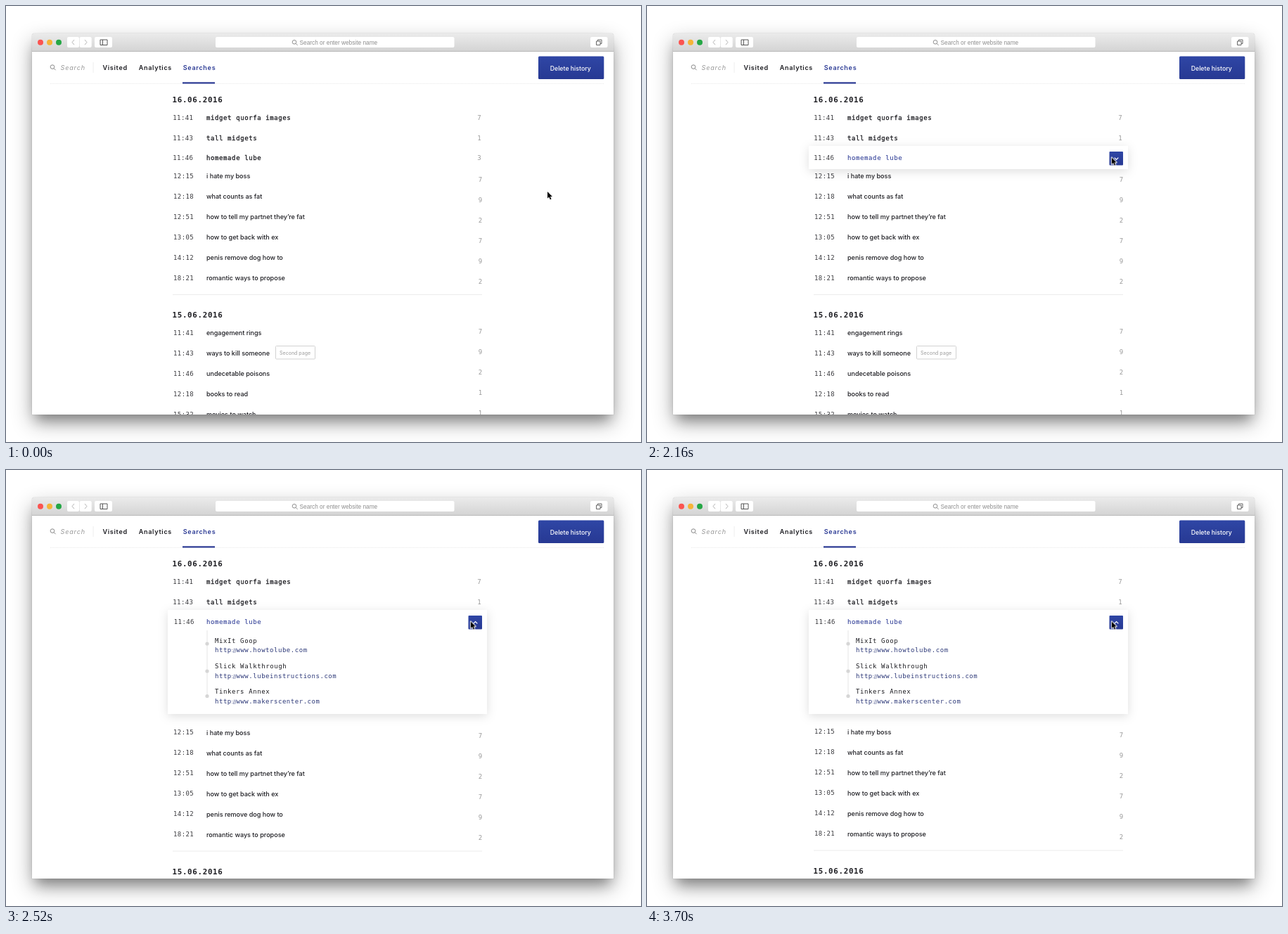
Animation of 903 by 620 pixels, one loop 3960 ms. Source, as an HTML page:

```html
<!DOCTYPE html>
<html lang="en">
<head>
<meta charset="utf-8">
<title>Search history</title>
<style>
  html, body { margin: 0; width: 100%; height: 100%; overflow: hidden; background: #fff; }
  .window {
    position: absolute; left: 37px; top: 39px; width: 827px; height: 542px;
    border-radius: 4px 4px 1px 1px;
    background: linear-gradient(#ebebeb, #d4d4d4 25px, #b9b9b9 25px, #b9b9b9 26px, #fff 26px);
    box-shadow: 0 0 1px rgba(0,0,0,.45), 0 12px 30px rgba(0,0,0,.32), 0 13px 17px -6px rgba(0,0,0,.3);
  }
  svg { position: absolute; left: 0; top: 0; width: 903px; height: 620px; }
  text { font: 500 9.05px Inter, sans-serif; fill: #1d1d22; white-space: pre; }
  .mono { font: 9px "DejaVu Sans Mono", monospace; letter-spacing: .6px; }
  .medium { stroke: currentColor; stroke-width: .3px; fill: currentColor; color: #1d1d22; }
  .time { font: 9px "DejaVu Sans Mono", monospace; letter-spacing: .4px; fill: #3a3a3e; }
  .count { font: 9px "DejaVu Sans Mono", monospace; fill: #999; text-anchor: middle; }
  .date { font: bold 10.8px "DejaVu Sans Mono", monospace; letter-spacing: .7px; }
  .nav { font-weight: 600; letter-spacing: .7px; }
  .hint { font-weight: 400; font-style: italic; letter-spacing: .85px; fill: #999; }
  .address { font: 8.3px "Liberation Sans", sans-serif; fill: #8e8e8e; }
  .tag { font-size: 7px; fill: #a8a8a8; }
  .action { font-size: 8.75px; fill: #fff; }
  .blue { fill: #2b3a94; }
  .link { fill: #2c3878; letter-spacing: .53px; }
  .tight { font: 7.5px Inter, sans-serif; letter-spacing: -.3px; }
  .icon { fill: none; stroke: #777; stroke-width: 1; }
  .white { fill: #fff; }
  #card { filter: drop-shadow(0 3px 7px rgba(0,0,0,.13)); }
  #toggle { transform-origin: 667px 216.5px; }
  #chevron { transform-origin: 667.5px 217px; fill: none; stroke: #fff; stroke-width: 1.3; }
</style>
</head>
<body>
<div class="window"></div>
<svg id="stage" viewBox="0 0 903 620"></svg>
<script>
const LOOP = 3960;
const stage = document.getElementById('stage');

const text = (x, y, cls, str, id = '') =>
  `<text x="${x}" y="${y + 3.3}" class="${cls}"${id && ` id="${id}"`}>${str}</text>`;
const box = (x, y, w, h, attrs) =>
  `<rect x="${x}" y="${y}" width="${w}" height="${h}" ${attrs}/>`;
const line = (d, attrs) => `<path d="${d}" ${attrs}/>`;
const lens = (x, y, color) =>
  `<g class="icon" style="stroke:${color}"><circle cx="${x}" cy="${y}" r="2.8"/>` +
  line(`M${x + 2} ${y + 2}l2.6 2.6`, '') + '</g>';

const rows = (y, gap, items) => items.map(([time, label, count], i) =>
  text(238, y + i * 29, 'time', time) +
  text(285, y + i * 29 + .3, '', label) +
  text(674.5, y + i * 29 + gap, 'count', count)).join('');

const topRow = (y, time, label, count) =>
  text(237.3, y, 'time', time) +
  text(285, y, 'mono medium', label) +
  text(673, y, 'count', count);

const site = (y, dotY, name, host) =>
  `<circle cx="286" cy="${dotY}" r="2.6" fill="#d6d6d6"/>` +
  text(297, y, 'mono', name) +
  text(297, y + 13.7, 'mono link', `http<tspan class="tight">://</tspan>www.${host}`);

const chrome =
  [['#fb5450', 49], ['#f5b437', 62], ['#25a745', 75]].map(([color, x]) =>
    `<circle cx="${x}" cy="51.7" r="4" fill="${color}"/>`).join('') +
  [[87, 17], [104.7, 17], [126, 25], [298, 339.5], [831, 24.5]].map(([x, w]) =>
    box(x, 44, w, 15, 'rx="2" class="white"')).join('') +
  line('M97 48l-3 3.6 3 3.6M112 48l3 3.6-3 3.6', 'class="icon" style="stroke:#b5b5b5"') +
  line('M134 48h10v7.5h-10zM137.5 48v7.5', 'class="icon" style="stroke:#555"') +
  line('M839.5 50h5.5v5.5h-5.5zM841.5 50v-2h5.5v5.5h-2', 'class="icon" style="stroke:#666"') +
  lens(410, 51.3, '#8e8e8e') +
  text(417.5, 51.7, 'address', 'Search or enter website name');

const header =
  lens(66, 86.6, '#888') +
  text(77.5, 87.3, 'hint', 'Search') +
  line('M124 80v15', 'stroke="#eee"') +
  text(137.5, 87.2, 'nav', 'Visited') +
  text(188.7, 87.2, 'nav', 'Analytics') +
  text(251.7, 87.2, 'nav blue', 'Searches') +
  line('M63 110.3h787', 'stroke="#e6e6e6" stroke-dasharray="1 1"') +
  box(251, 108.3, 46, 2.2, 'class="blue"') +
  box(757, 71.5, 93.3, 32.5, 'rx="1.5" fill="url(#button)"') +
  text(773.7, 88.4, 'action', 'Delete history');

const list = `<g id="list">` +
  rows(241.5, 4.7, [
    ['12:15', 'i hate my boss', 7],
    ['12:18', 'what counts as fat', 9],
    ['12:51', 'how to tell my partnet they’re fat', 2],
    ['13:05', 'how to get back with ex', 7],
    ['14:12', 'penis remove dog how to', 9],
    ['18:21', 'romantic ways to propose', 2]]) +
  line('M237 410.5h440', 'stroke="#ececec"') +
  text(236.5, 439.8, 'date', '15.06.2016') +
  rows(464.3, -1.5, [
    ['11:41', 'engagement rings', 7],
    ['11:43', 'ways to kill someone', 9],
    ['11:46', 'undecetable poisons', 2],
    ['12:18', 'books to read', 1],
    ['15:32', 'movies to watch', 1]]) +
  box(383.5, 483.5, 56, 18.5, 'rx="1" fill="#fff" stroke="#d2d2d2"') +
  text(389, 492.4, 'tag', 'Second page') + '</g>';

const hoverRow =
  box(230, 199, 454, 33, 'id="card" class="white"') +
  text(237.3, 215.5, 'time', '11:46', 'hoverTime') +
  text(285, 215.3, 'mono medium', 'homemade lube', 'hoverLabel') +
  text(673, 215.5, 'count', 3, 'hoverCount') +
  '<g clip-path="url(#reveal)"><g id="details">' +
  line('M286 228v94', 'stroke="#e6e6e6"') +
  site(242.3, 247, 'MixIt Goop', 'howtolube.com') +
  site(278.5, 286, 'Slick Walkthrough', 'lubeinstructions.com') +
  site(314.7, 321.5, 'Tinkers Annex', 'makerscenter.com') +
  '</g></g>' +
  '<g id="toggle">' +
  box(657.5, 207, 19.5, 19.5, 'rx="1" fill="url(#button)"') +
  line('M664.7 215.6l2.8 2.8 2.8-2.8', 'id="chevron"') + '</g>';

const cursor = '<g id="cursorX"><g id="cursorY">' +
  line('M0 0v9.6l2.2-2 1.6 3.7 1.7-.7-1.6-3.6h3z',
    'fill="#000" stroke="#fff" stroke-width="1.8" paint-order="stroke" stroke-linejoin="round"') +
  '</g></g>';

stage.innerHTML =
  `<defs><clipPath id="page">${box(37, 65, 827, 516, '')}</clipPath>` +
  `<clipPath id="reveal">${box(230, 199, 454, 33, 'id="revealBox"')}</clipPath>` +
  '<linearGradient id="button" x2="0" y2="1"><stop stop-color="#2f46a5"/>' +
  '<stop offset="1" stop-color="#273993"/></linearGradient></defs>' +
  chrome + '<g clip-path="url(#page)">' + header +
  text(236.5, 134, 'date', '16.06.2016') +
  topRow(158.5, '11:41', 'midget quorfa images', 7) +
  topRow(187.5, '11:43', 'tall midgets', 1) +
  list + hoverRow + '</g>' + cursor;

// Each step is [ms, properties, easing towards the next step].
function play(id, ...steps) {
  const frames = steps.map(([ms, props, easing = 'linear']) =>
    ({ offset: ms / LOOP, easing, ...props }));
  frames.push({ ...frames[frames.length - 1], offset: 1 });
  document.getElementById(id).animate(frames, { duration: LOOP, iterations: Infinity });
}
const x = n => ({ transform: `translateX(${n}px)` });
const y = n => ({ transform: `translateY(${n}px)` });
const fade = n => ({ opacity: n });
const height = n => ({ height: `${n}px` });
const ink = (color, width) => ({ color, strokeWidth: `${width}px` });

// Pointer glides to the row, then nudges onto the toggle.
play('cursorX', [0, x(770)], [150, x(770), 'ease-in-out'], [800, x(664.7)],
  [840, x(664.7), 'ease-in-out'], [1060, x(660.8)]);
play('cursorY', [0, y(264)], [150, y(264), 'cubic-bezier(.7,0,.5,1)'], [800, y(213.6)],
  [840, y(213.6), 'ease-in-out'], [1060, y(215.5)]);

// Hover state.
play('card', [0, { ...fade(0), ...height(33) }], [610, { ...fade(0), ...height(33) }],
  [730, { ...fade(1), ...height(33) }],
  [2180, { ...fade(1), ...height(33) }, 'ease-out'], [2360, { ...fade(1), ...height(148) }]);
play('hoverLabel', [0, ink('#1d1d22', .3)], [610, ink('#1d1d22', .3)], [730, ink('#2b3a94', .08)]);
play('hoverCount', [0, fade(1)], [610, fade(1)], [690, fade(0)]);
play('toggle', [0, { opacity: 0, transform: 'scale(.6)' }],
  [630, { opacity: 0, transform: 'scale(.6)' }, 'ease-out'],
  [800, { opacity: 1, transform: 'scale(.95)' }], [880, { opacity: 1, transform: 'scale(1)' }]);

// Click: the card opens and the list makes room.
play('hoverTime', [0, x(0)], [2180, x(0)], [2300, x(1.5)]);
play('chevron', [0, { transform: 'rotate(0deg)' }], [2180, { transform: 'rotate(0deg)' }, 'ease-out'],
  [2340, { transform: 'rotate(180deg)' }]);
play('revealBox', [0, height(33)], [2180, height(33), 'ease-out'], [2360, height(148)]);
play('details', [0, fade(0)], [2200, fade(0)], [2340, fade(1)]);
play('list', [0, y(0)], [2200, y(0), 'cubic-bezier(.3,.1,.4,1)'], [2525, y(131.5)],
  [2720, y(131.5)], [3060, y(130.5)]);
</script>
</body>
</html>
```
